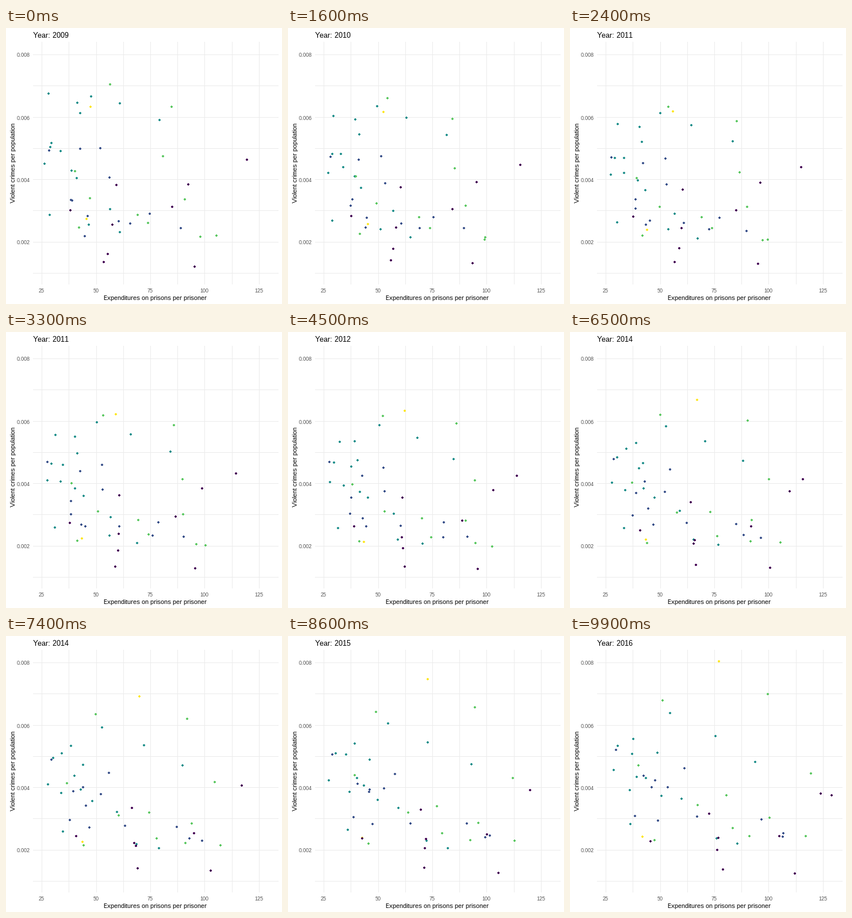
Write a matplotlib script that moves like this. It is 480 px wide and 480 px high and loops after 10 s.

```python
import numpy as np
import matplotlib.pyplot as plt
from matplotlib.animation import FuncAnimation
from matplotlib.path import Path

SIZE, DPI = 480, 100
FRAMES, INTERVAL = 100, 100
PX = 72 / DPI  # points per pixel
FIRST, LAST = 2009, 2016
YEARS = LAST - FIRST
ORIGIN = np.array([-32, 480])  # pixel where both quantities are zero

plt.rcParams.update({
    "font.family": "Liberation Sans",
    "text.hinting": "native",
    "text.hinting_factor": 1,
})

# Colour, mid-period sag (spending, crime), and for each dot
# its first and last position: x0, y0, x1, y1.
GROUPS = [
    ("#3B528B", (0.05, 0.08), [
        (75, 213, 80, 198), (129, 210, 142, 263), (164, 209, 199, 230),
        (180, 260, 170, 263), (113, 299, 128, 243), (115, 300, 113, 313),
        (142, 327, 153, 321), (137, 362, 148, 251), (196, 336, 221, 314),
        (216, 340, 370, 349), (250, 323, 333, 319), (304, 348, 371, 343)]),
    ("#21908C", (0, 0.11), [
        (74, 114, 108, 205), (124, 130, 110, 179), (148, 119, 174, 134),
        (129, 148, 116, 245), (198, 131, 253, 174), (267, 160, 322, 219),
        (79, 200, 152, 203), (77, 207, 83, 191), (95, 214, 104, 268),
        (67, 236, 76, 233), (114, 248, 132, 247), (123, 261, 159, 278),
        (181, 315, 194, 283), (76, 325, 105, 327), (144, 342, 255, 352),
        (198, 355, 291, 361)]),
    ("#5DC863", (0.05, 0.12), [
        (181, 98, 161, 112), (288, 137, 344, 101), (273, 223, 419, 239),
        (120, 249, 119, 225), (146, 296, 222, 294), (311, 298, 347, 316),
        (127, 347, 147, 355), (229, 325, 272, 277), (247, 339, 283, 334),
        (338, 363, 410, 348), (366, 361, 312, 348)]),
    ("#FDE725", (0, 0.12), [
        (147, 137, 259, 44), (140, 332, 126, 349)]),
    ("#440154", (0.065, 0), [
        (419, 229, 436, 274), (192, 273, 242, 309), (112, 317, 140, 357),
        (289, 311, 364, 348), (185, 342, 256, 372), (177, 393, 258, 351),
        (170, 407, 266, 406), (328, 415, 391, 413), (317, 272, 455, 277)]),
]

# Frames on which each whole year falls
KEYS = np.round(np.linspace(0, FRAMES - 1, YEARS + 1)).astype(int)


def yearly_positions(ends, sag, rng):
    """Straight drift, sagging towards the origin mid-period, plus wobble."""
    start, end = np.split(np.array(ends, float), 2, axis=1)
    s = np.linspace(0, 1, YEARS + 1)[:, None, None]
    bump = 4 * s * (1 - s)
    pos = start + s * (end - start)
    pos += (ORIGIN - pos) * np.array(sag) * bump
    return pos + rng.normal(0, 3, pos.shape) * (bump > 0)


rng = np.random.default_rng(5)
POSITIONS = np.concatenate(
    [yearly_positions(ends, sag, rng) for _, sag, ends in GROUPS], axis=1)
POSITIONS[-2, -1] = np.nan  # the last dot has no value in 2015
COLORS = [color for color, _, ends in GROUPS for _ in ends]


def dots_at(i):
    k = np.searchsorted(KEYS, i, side="right") - 1
    pos = POSITIONS[k]
    if i > KEYS[k]:
        t = (i - KEYS[k]) / (KEYS[k + 1] - KEYS[k])
        pos = pos + t * (POSITIONS[k + 1] - pos)
    return np.nan_to_num(np.round(pos), nan=-50)


fig = plt.figure(figsize=(SIZE / DPI, SIZE / DPI), dpi=DPI, facecolor="white")
ax = fig.add_axes([0, 0, 1, 1])
ax.set(xlim=(0, SIZE), ylim=(SIZE, 0))
ax.axis("off")


def label(x, y, text, px, color="black", ha="center", **kw):
    return ax.text(x, y, text, fontsize=px * PX, color=color, ha=ha,
                   va="baseline", **kw)


# Snapping would push the pixel-centred lines one pixel off.
grid = dict(colors="#EBEBEB", linewidth=PX, snap=False, zorder=1)
cols = np.round(62.1 + 47.22 * np.arange(9)) + 0.5
lines = np.round(46.2 + 54.25 * np.arange(8)) + 0.5
ax.vlines(cols, 24, 446, **grid)
ax.hlines(lines, 47, 474, **grid)

for n, x in enumerate(cols[::2]):
    label(x - 0.5, 460, str(25 * (n + 1)), 9, "#4D4D4D")
for n, y in enumerate(lines[::2]):
    label(42, y + 4, f"{0.008 - 0.002 * n:.3f}", 9, "#4D4D4D", "right")

label(259.5, 473, "Expenditures on prisons per prisoner", 11)
label(16, 235, "Violent crimes per population", 11, rotation=90,
      rotation_mode="anchor")
title = label(47, 17, f"Year: {FIRST}", 13.2, ha="left")

# A four-pixel dot: a square without its corner pixels
quarter = np.array([(2, -1), (2, 1), (1, 1)])
turn = np.array([(0, 1), (-1, 0)])
corners = np.vstack([quarter @ np.linalg.matrix_power(turn, n)
                     for n in range(4)])
dot = Path(np.vstack([corners, corners[:1]]), closed=True)

dots = ax.scatter(*dots_at(0).T, s=(3.9 * PX) ** 2, c=COLORS, marker=dot,
                  linewidths=0, antialiased=False, zorder=3)
dots.set_snap(False)


def update(i):
    dots.set_offsets(dots_at(i))
    title.set_text(f"Year: {round(FIRST + YEARS * i / (FRAMES - 1))}")
    return dots, title


anim = FuncAnimation(fig, update, frames=FRAMES, interval=INTERVAL,
                     repeat=True, repeat_delay=0)
plt.show()
```
